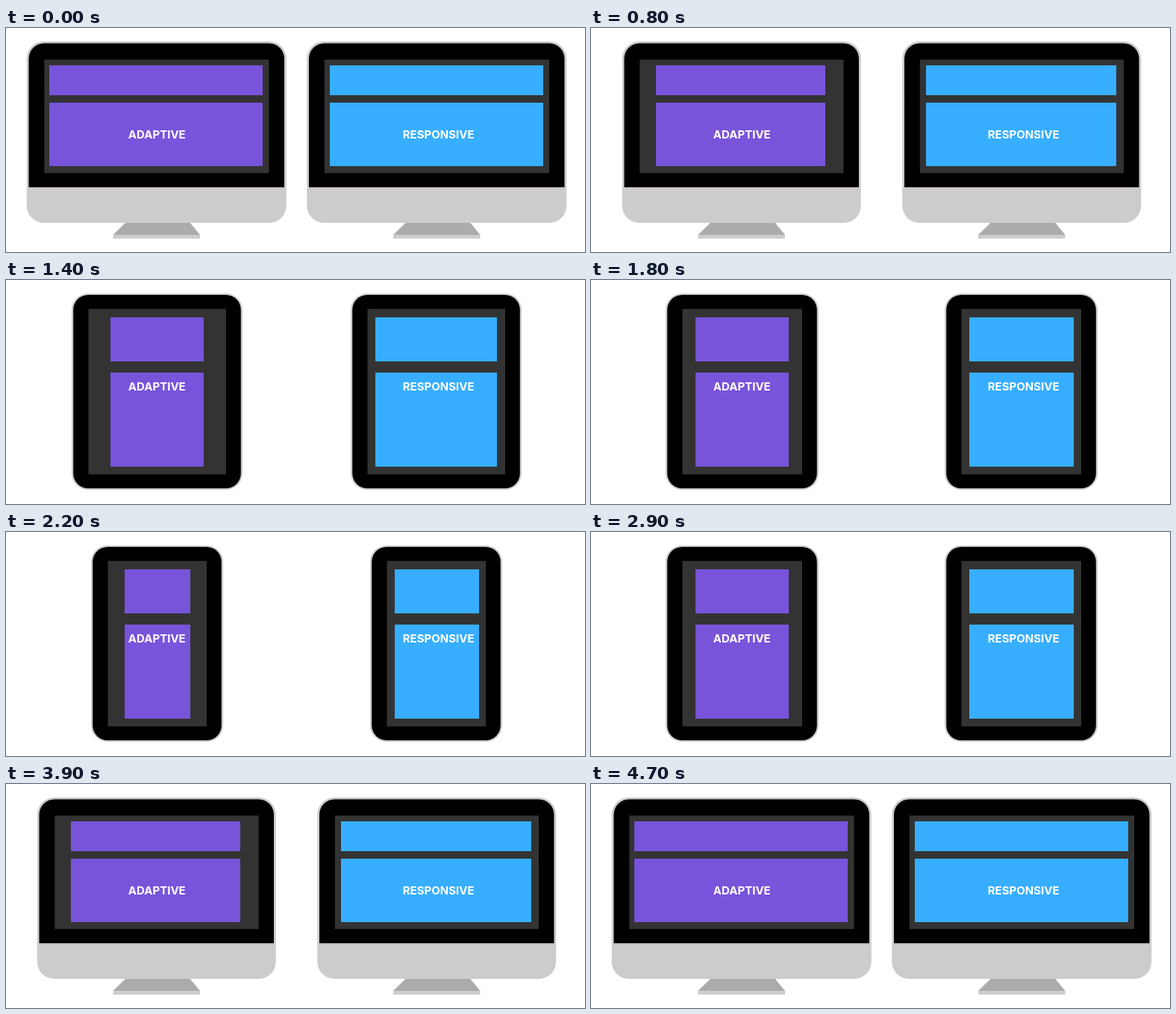
An HTML page for the animation above (4900 ms loop, 776x300 px).

```html
<!DOCTYPE html>
<html lang="en">
<head>
<meta charset="utf-8">
<title>Adaptive and responsive layouts</title>
<style>
  html, body { margin: 0; width: 100%; height: 100%; overflow: hidden; background: #fff; }
  svg { display: block; }
  text { font: 700 15px Inter, "Open Sans", sans-serif; fill: #fff; text-anchor: middle; }
</style>
</head>
<body>
<svg width="776" height="300" viewBox="0 0 776 300">
  <g id="picture"></g>
  <text x="202.3" y="148">ADAPTIVE</text>
  <text x="579.7" y="148">RESPONSIVE</text>
</svg>
<script>
const LOOP = 4900, STEP = 200, HOLD_END = 2700;
const DESKTOP_POSES = 7, LAST = 11;
const BREAKPOINTS = [286, 227, 125, 88];
const PURPLE = '#7854da', BLUE = '#37aeff', SILVER = '#ccc';

const rect = (x1, y1, x2, y2, fill, r = 0) =>
  `<rect x="${x1}" y="${y1}" width="${x2 - x1}" height="${y2 - y1}" rx="${r}" fill="${fill}"/>`;

const blocks = (x, width, color, [top, split, next, bottom]) =>
  rect(x, top, x + width, split, color) + rect(x, next, x + width, bottom, color);

const shifted = (dx, shapes) => `<g transform="translate(${dx})">${shapes}</g>`;

function monitor(left) {
  const right = 403.75 - left, a = left + 2.5, b = right - 2.75, r = 20.5;
  return '<path d="M161 260H246L260 277H143.5Z" fill="#ababab"/>' +
    rect(143.5, 277, 260, 282, SILVER) +
    rect(left - .25, 18, right, 261, SILVER, 23) +
    `<path d="M${a} 213V41a${r} ${r} 0 0 1 ${r} ${-r}H${b - r}a${r} ${r} 0 0 1 ${r} ${r}V213Z"/>` +
    rect(a, 213, b, 214, '#a08c92') +
    rect(left + 23.3, 42.3, right - 23.25, 194.3, '#333');
}

function slate(left) {
  const right = 405 - left;
  return rect(left, 18, right, 281, SILVER, 22) +
    rect(left + 2.2, 20, right - 2.2, 279, '#000', 20) +
    rect(left + 22.5, 38.7, right - 22, 260.3, '#333');
}

// Desktops shrink faster with each pose; tablets shrink evenly.
function desktopLayout(pose) {
  const inset = pose * (pose + 3) / 2, left = 28 + inset;
  return {
    device: monitor(left), gap: 375.5, center: 201, rows: [50, 90, 100, 185],
    from: 434 + Math.floor(inset * 15 / 14),
    to: 720 - Math.round(inset * 16 / 14)
  };
}

function tabletLayout(pose) {
  const left = Math.max(88, 114 - 7 * (LAST - pose));
  return {
    device: slate(left), gap: 374, center: 203, rows: [50, 109, 124, 250],
    from: left + 407,
    to: 658 - Math.round((left - 88) * 12 / 13)
  };
}

// The fluid block follows the device; the fixed one takes the widest breakpoint that fits.
function scene(pose) {
  const { device, gap, center, rows, from, to } =
    pose < DESKTOP_POSES ? desktopLayout(pose) : tabletLayout(pose);
  const fluid = to - from;
  const fixed = BREAKPOINTS.find(width => width <= fluid);
  return device + shifted(gap, device) +
    blocks(Math.floor(center - fixed / 2), fixed, PURPLE, rows) +
    blocks(from, fluid, BLUE, rows);
}

function poseAt(time) {
  return time < HOLD_END
    ? Math.min(LAST, Math.floor(time / STEP))
    : LAST - 1 - Math.floor((time - HOLD_END) / STEP);
}

const picture = document.getElementById('picture');
const start = performance.now();
let shown = -1;

function draw() {
  const pose = poseAt((performance.now() - start) % LOOP);
  if (pose !== shown) picture.innerHTML = scene(shown = pose);
  requestAnimationFrame(draw);
}
draw();
</script>
</body>
</html>
```
